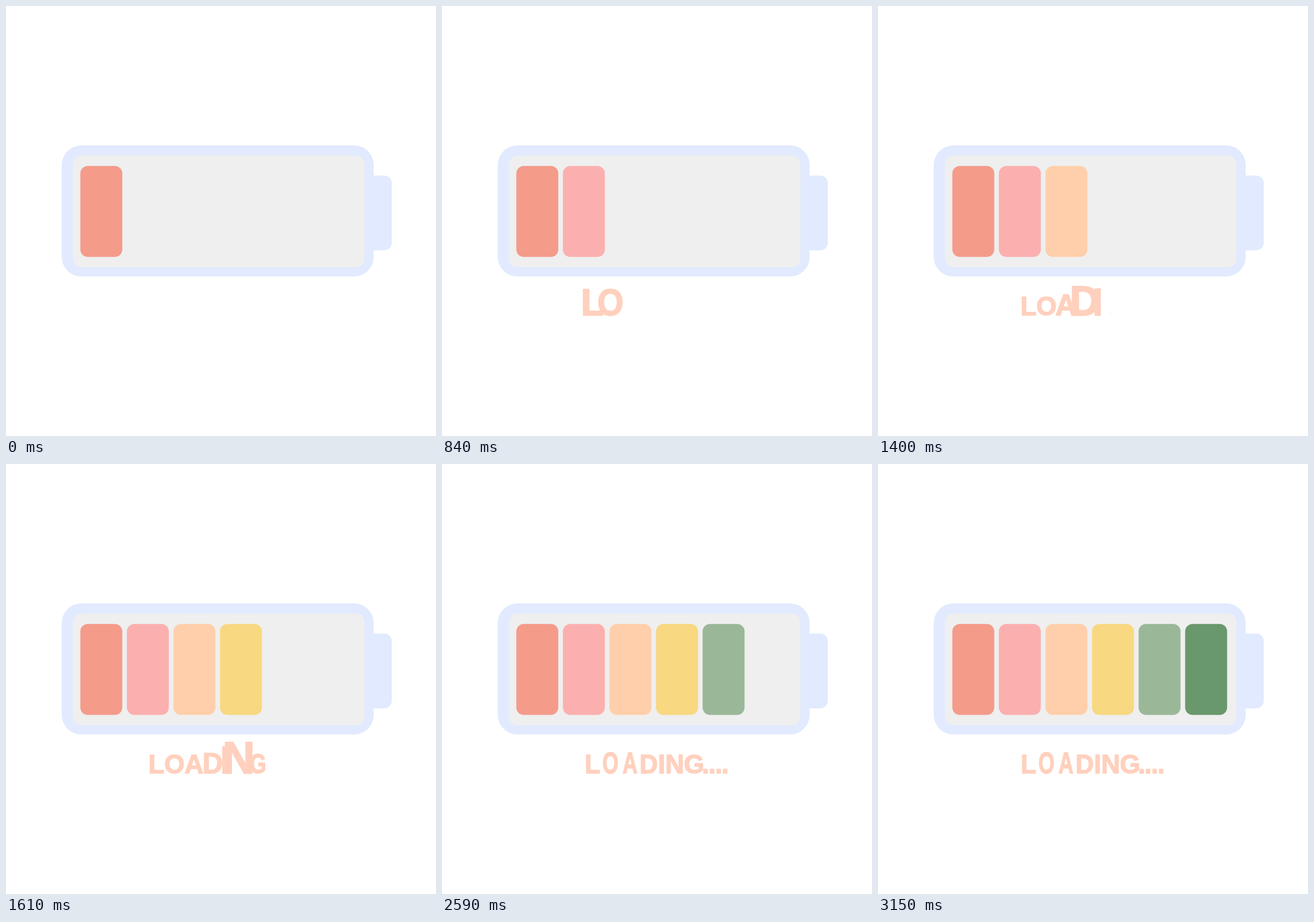
Recreate the animation shown at these times as an HTML page with a canvas. Size 748x748 px, loop 3220 ms.

```html
<!DOCTYPE html>
<html lang="en">
<head>
<meta charset="utf-8">
<title>Loading battery</title>
<style>
  html, body { margin: 0; width: 100%; height: 100%; overflow: hidden; background: #fff; }
  canvas { display: block; }
</style>
</head>
<body>
<canvas width="748" height="748"></canvas>
<script>
const ctx = document.querySelector('canvas').getContext('2d');
const LOOP = 3220, STEP = 70, BASELINE = 538;
const REST = .95, PEAK = 1.62;
const colors = ['#f49b8a', '#fbb0af', '#ffcfab', '#f8d880', '#9ab898', '#69986d'];

// Smooth 0 to 1 between two times
function ease(t, from, to) {
  const k = Math.min(1, Math.max(0, (t - from) / (to - from)));
  return k * k * (3 - 2 * k);
}

function box(color, x, y, w, h, radius) {
  ctx.fillStyle = color;
  ctx.beginPath();
  ctx.roundRect(x, y, w, h, radius);
  ctx.fill();
}

function drawBattery(t) {
  box('#e1eafe', 97, 242.5, 542.5, 228, 34);
  box('#e1eafe', 636, 295, 35, 130, [0, 13, 13, 0]);
  box('#efefef', 116.5, 260, 507, 194.5, 15);
  colors.forEach((color, i) => {
    if (t >= LOOP * i / colors.length) box(color, 129.3 + 81 * i, 278.3, 73, 158.3, 13);
  });
}

// A glyph shoots up from the baseline, width lagging height, then sinks to its resting size
function drawGlyph(char, x, age, squeeze = 0) {
  if (age <= 0) return;
  const rise = ease(age, 0, 230);
  const size = rise * (PEAK + (REST - PEAK) * ease(age, 230, 630));
  ctx.save();
  ctx.translate(x, BASELINE);
  ctx.scale(size * Math.sqrt(rise) * (1 - squeeze), size * (1 + squeeze * .6));
  ctx.fillText(char, 0, 0);
  ctx.strokeText(char, 0, 0);
  ctx.restore();
}

function drawText(t) {
  ctx.font = 'bold 48px "Liberation Sans", Arial, sans-serif';
  ctx.textAlign = 'center';
  ctx.fillStyle = ctx.strokeStyle = '#ffd0bd';
  ctx.lineWidth = 1.5;
  ctx.miterLimit = 2;

  let left = 248;
  [...'LOADING'].forEach((char, i) => {
    const width = ctx.measureText(char).width * .94;
    const start = 440 + 242 * i - 11.5 * i * i;
    // A late ripple narrows the letters around the second and third
    const squeeze = .27 * Math.exp(-((i - 1.5) ** 2)) * ease(t, 2200, 2550);
    drawGlyph(char, left + width / 2, t - start, squeeze);
    left += width;
  });

  for (let i = 0; i < 4; i++) drawGlyph('.', 458.5 + 11.4 * i, t - 1660 - 100 * i);
}

const origin = performance.now();

function draw() {
  const elapsed = Math.max(0, performance.now() - origin) % LOOP;
  const t = Math.floor(elapsed / STEP) * STEP;
  ctx.fillStyle = '#fff';
  ctx.fillRect(0, 0, 748, 748);
  drawBattery(t);
  drawText(t);
  requestAnimationFrame(draw);
}
draw();
</script>
</body>
</html>
```
